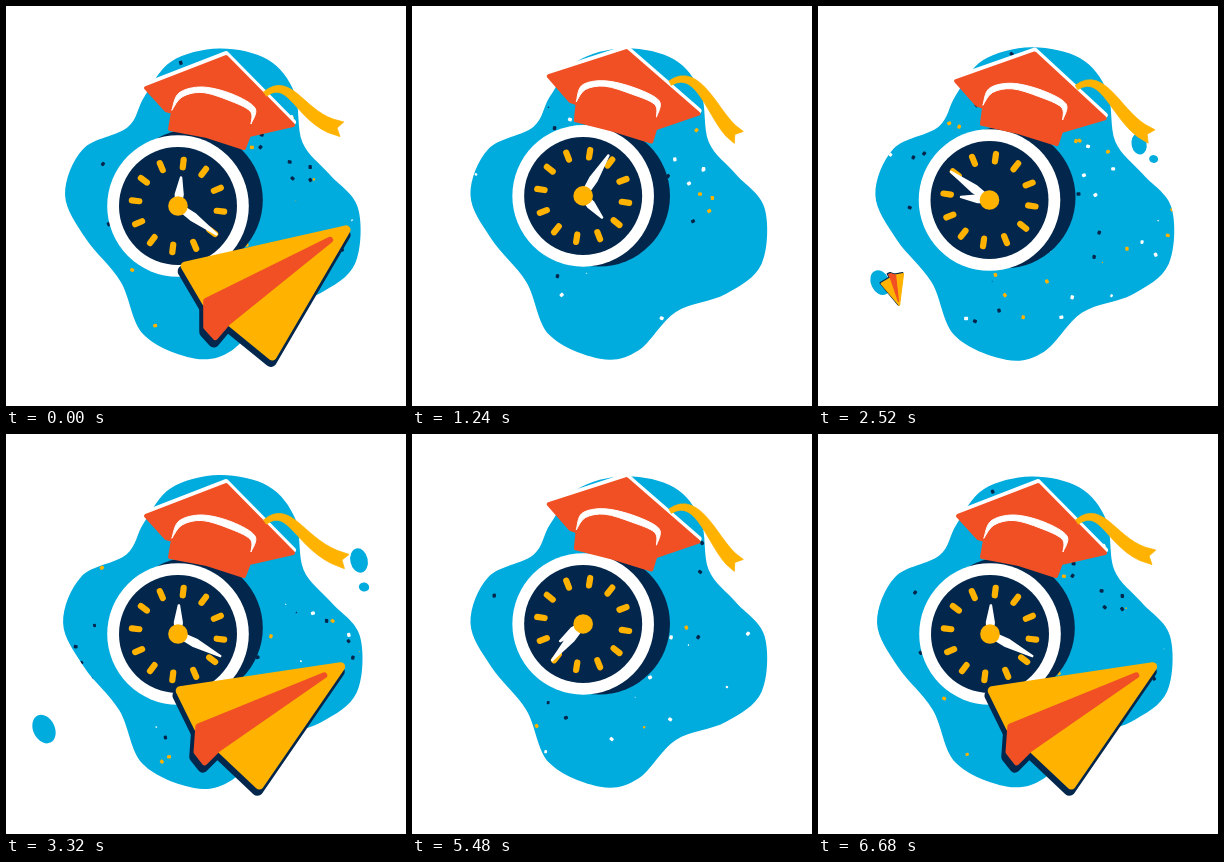
Animation, 400 px wide and 400 px high, one loop 6720 ms. Source, as an HTML page with a canvas:

```html
<!DOCTYPE html>
<html lang="en">
<head>
<meta charset="utf-8">
<title>Study time</title>
<style>
  html, body { margin: 0; width: 100%; height: 100%; overflow: hidden; background: #fff; }
  canvas { display: block; width: 400px; height: 400px; }
</style>
</head>
<body>
<canvas id="stage"></canvas>
<script>
const LOOP = 6720, ORBIT = LOOP / 2, TAU = Math.PI * 2, DEG = Math.PI / 180;
const BLUE = '#00abdd', NAVY = '#03274c', YELLOW = '#ffb300', RED = '#f15024', WHITE = '#fff';

const canvas = document.getElementById('stage');
const ctx = canvas.getContext('2d');
const ratio = window.devicePixelRatio || 1;
canvas.width = canvas.height = 400 * ratio;

const clamp = v => Math.max(0, Math.min(1, v));
const bezier = (p, u) => [0, 1].map(i => {
  const v = 1 - u;
  return v * v * v * p[0][i] + 3 * v * v * u * p[1][i] + 3 * v * u * u * p[2][i] + u * u * u * p[3][i];
});

// Append a smooth curve through the points
function curve(p, closed) {
  const n = p.length;
  const at = i => closed ? p[(i + n) % n] : p[Math.max(0, Math.min(n - 1, i))];
  for (let i = 0; i < (closed ? n : n - 1); i++) {
    const [a, b, c, d] = [at(i - 1), at(i), at(i + 1), at(i + 2)];
    ctx.bezierCurveTo(b[0] + (c[0] - a[0]) / 6, b[1] + (c[1] - a[1]) / 6,
      c[0] - (d[0] - b[0]) / 6, c[1] - (d[1] - b[1]) / 6, c[0], c[1]);
  }
}
function line(p) {
  ctx.beginPath();
  p.forEach(q => ctx.lineTo(q[0], q[1]));
}
// Polygon whose corners are rounded by its outline
function rounded(p, color, width) {
  line(p);
  ctx.closePath();
  ctx.fillStyle = ctx.strokeStyle = color;
  ctx.lineWidth = width;
  ctx.fill();
  ctx.stroke();
}
function oval(x, y, rx, ry, turn, color) {
  ctx.beginPath();
  ctx.ellipse(x, y, rx, ry, turn, 0, TAU);
  ctx.fillStyle = color;
  ctx.fill();
}
const disc = (x, y, r, color) => oval(x, y, r, r, 0, color);

const BLOB = [[213, 42], [262, 53], [289, 86], [297, 136], [324, 168], [353, 202], [350, 258],
  [314, 288], [264, 306], [226, 345], [188, 353], [137, 329], [114, 276], [79, 233], [58, 189],
  [76, 143], [121, 121], [138, 90], [165, 55]];

function drawBlob(t) {
  const grow = (1 - Math.cos(TAU * t / LOOP)) / 2;
  const p = BLOB.map(([x, y]) => [208 + (x - 208) * (.993 + .013 * grow), 198 + (y - 198) * (.996 + .01 * grow)]);
  ctx.beginPath();
  ctx.moveTo(...p[0]);
  curve(p, true);
  ctx.fillStyle = BLUE;
  ctx.fill();
}

// Drops drift away at constant speed; x, y hold at 3320 ms
const DROPS = [
  { x: 38, y: 295, vx: -.0305, vy: .023, rx: 10.8, ry: 15, turn: -25 },
  { x: 353, y: 126.5, vx: .04, vy: -.0145, rx: 8.7, ry: 12.3, turn: -12 },
  { x: 358, y: 153, vx: .028, vy: 0, rx: 5.2, ry: 4.5, turn: 10 }
];
function drawDrops(t) {
  if (t > 5400) return;
  const size = clamp((t - 1900) / 720);
  for (const d of DROPS) {
    const age = t - 3320;
    oval(d.x + d.vx * age, d.y + d.vy * age, d.rx * size, d.ry * size, d.turn * DEG, BLUE);
  }
}

let seed = 41;
const random = () => (seed = (seed * 16807) % 2147483647) / 2147483647;
const confetti = Array.from({ length: 240 }, (_, i) => {
  const a = random() * TAU, r = 50 + random() * 105;
  return {
    x: 208 + Math.cos(a) * r, y: 200 + Math.sin(a) * r,
    dx: random() * 10 - 5, dy: -12 - random() * 16,
    birth: random() * LOOP, turn: random() * TAU, tint: [NAVY, YELLOW, WHITE][i % 3]
  };
});
// Drawn inside the current path
function drawConfetti(t) {
  ctx.save();
  ctx.clip();
  for (const d of confetti) {
    const age = (t - d.birth + LOOP) % LOOP;
    const size = clamp(Math.min(age, 1200 - age) / 150);
    if (!size) continue;
    ctx.save();
    ctx.translate(d.x + d.dx * age / 1000, d.y + d.dy * age / 1000);
    ctx.rotate(d.turn + age / 900);
    ctx.scale(size, size);
    rounded([[-1, -.7], [1, -.7], [1, .7], [-1, .7]], d.tint, 2);
    ctx.restore();
  }
  ctx.restore();
}

function drawHand(angle, length) {
  ctx.save();
  ctx.rotate(angle * DEG);
  const mid = length * .4;
  rounded([[0, -2.5], [mid, -3.8], [length, -.4], [length, .4], [mid, 3.8], [0, 2.5]], WHITE, 1.6);
  ctx.restore();
}

function drawClock(phase, lift) {
  const x = 172 - lift, y = 200 - 12 * lift;
  disc(x + 14 + 2.4 * lift, y - 6 + 7 * lift, 70.8, NAVY);
  disc(x, y, 70.8, WHITE);
  disc(x, y, 59, NAVY);
  ctx.save();
  ctx.translate(x, y);
  ctx.strokeStyle = YELLOW;
  ctx.lineWidth = 6.2;
  for (let i = 0; i < 12; i++) {
    const a = (i * 30 + 7 + 2 * lift) * DEG, c = Math.cos(a), s = Math.sin(a);
    line([[c * 39, s * 39], [c * 46.5, s * 46.5]]);
    ctx.stroke();
  }
  drawHand(276 + 360 * phase / ORBIT, 29);
  drawHand(36 + 720 * phase / ORBIT, 48);
  disc(0, 0, 9.8, YELLOW);
  ctx.restore();
}

const CAP = [[140, 82], [220, 51], [287, 119], [243, 129], [238, 142], [201, 130], [164, 123], [167, 106], [160, 104]];
const SHINE_TOP = [[166, 104], [173, 87], [196, 81], [226, 88], [249, 102], [245, 118]];
const SHINE_LOW = [[245, 118], [244, 105], [222, 94], [196, 86.5], [176, 91], [166, 104]];

function drawCap(lift) {
  // Rising, the cap leans left and its sides bend up
  const raise = ([x, y]) => [
    x + lift * (y - 125) / 11,
    y - lift * 7 * (1 + ((x - 215) / 75) ** 2)
  ];
  const p = CAP.map(raise);
  line(p.slice(0, 3).map(([x, y]) => [x, y - 3]));
  ctx.strokeStyle = WHITE;
  ctx.lineWidth = 6;
  ctx.stroke();
  rounded(p, RED, 4);
  const top = SHINE_TOP.map(raise);
  ctx.beginPath();
  ctx.moveTo(...top[0]);
  curve(top);
  curve(SHINE_LOW.map(raise));
  ctx.fillStyle = ctx.strokeStyle = WHITE;
  ctx.lineWidth = 1;
  ctx.fill();
  ctx.stroke();
}

// A ribbon that widens along its spine and ends in a swallowtail
function drawTassel(t, lift) {
  const swing = Math.sin(Math.PI * t / LOOP);
  const spine = [
    [259 - lift, 88 - 13 * lift],
    [285 + 3 * lift, 68 - 12 * lift],
    [294 + 9 * lift, 112],
    [331 - 13 * lift + 5 * swing, 122 + 5 * lift + 4 * swing]
  ];
  const upper = [], lower = [];
  const steps = 16;
  for (let i = 0; i <= steps; i++) {
    const u = i / steps, [x, y] = bezier(spine, u), [nx, ny] = bezier(spine, u + .01);
    const a = Math.atan2(ny - y, nx - x), w = 2.5 + 5 * u;
    const reach = i === steps ? 5 : 0;
    const side = k => [x + Math.cos(a) * reach - k * w * Math.sin(a), y + Math.sin(a) * reach + k * w * Math.cos(a)];
    upper.push(side(-1));
    lower.unshift(side(1));
  }
  rounded([...upper, spine[3], ...lower], YELLOW, .8);
}

const PLANE = [[58, -39], [-103, -3], [-82, 33], [-16, 87]];
const FOLD = [[42, -29], [-82, 32], [-82, 58], [-73, 68], [-61, 54]];
const APPROACH = [[78, 286], [84, 312], [237, 291], [282, 263]];
const DEPART = [[282, 263], [327, 235], [375, 160], [307, 107]];

// u is 0 at the nearest point, -1 and 1 a quarter orbit away
function drawPlane(u) {
  if (Math.abs(u) > 1.25) return;
  const [x, y] = u < 0 ? bezier(APPROACH, u + 1) : bezier(DEPART, u);
  const size = Math.exp(-1.384 * (u * u - .2 * u));
  ctx.save();
  ctx.translate(x, y);
  ctx.rotate((-88 * u - 22 * u ** 3) * DEG);
  ctx.scale(size, size);
  ctx.save();
  ctx.translate(-1.5, 5);
  rounded(PLANE, NAVY, 12);
  rounded(FOLD, NAVY, 11);
  ctx.restore();
  rounded(PLANE, YELLOW, 9);
  rounded(FOLD, RED, 6);
  ctx.restore();
}

function draw(t) {
  const phase = t % ORBIT;
  const lift = (1 - Math.cos(TAU * phase / ORBIT)) / 2;
  const u = (phase > ORBIT / 2 ? phase - ORBIT : phase) / (ORBIT / 4);
  const behind = u > .8 || u < -1.05;
  ctx.setTransform(ratio, 0, 0, ratio, 0, 0);
  ctx.fillStyle = WHITE;
  ctx.fillRect(0, 0, 400, 400);
  ctx.lineJoin = ctx.lineCap = 'round';
  drawDrops(t);
  drawBlob(t);
  drawConfetti(t);
  if (behind) drawPlane(u);
  drawClock(phase, lift);
  drawCap(lift);
  drawTassel(t, lift);
  if (!behind) drawPlane(u);
}

const start = performance.now();
function tick() {
  draw((performance.now() - start) % LOOP);
  requestAnimationFrame(tick);
}
tick();
</script>
</body>
</html>
```
